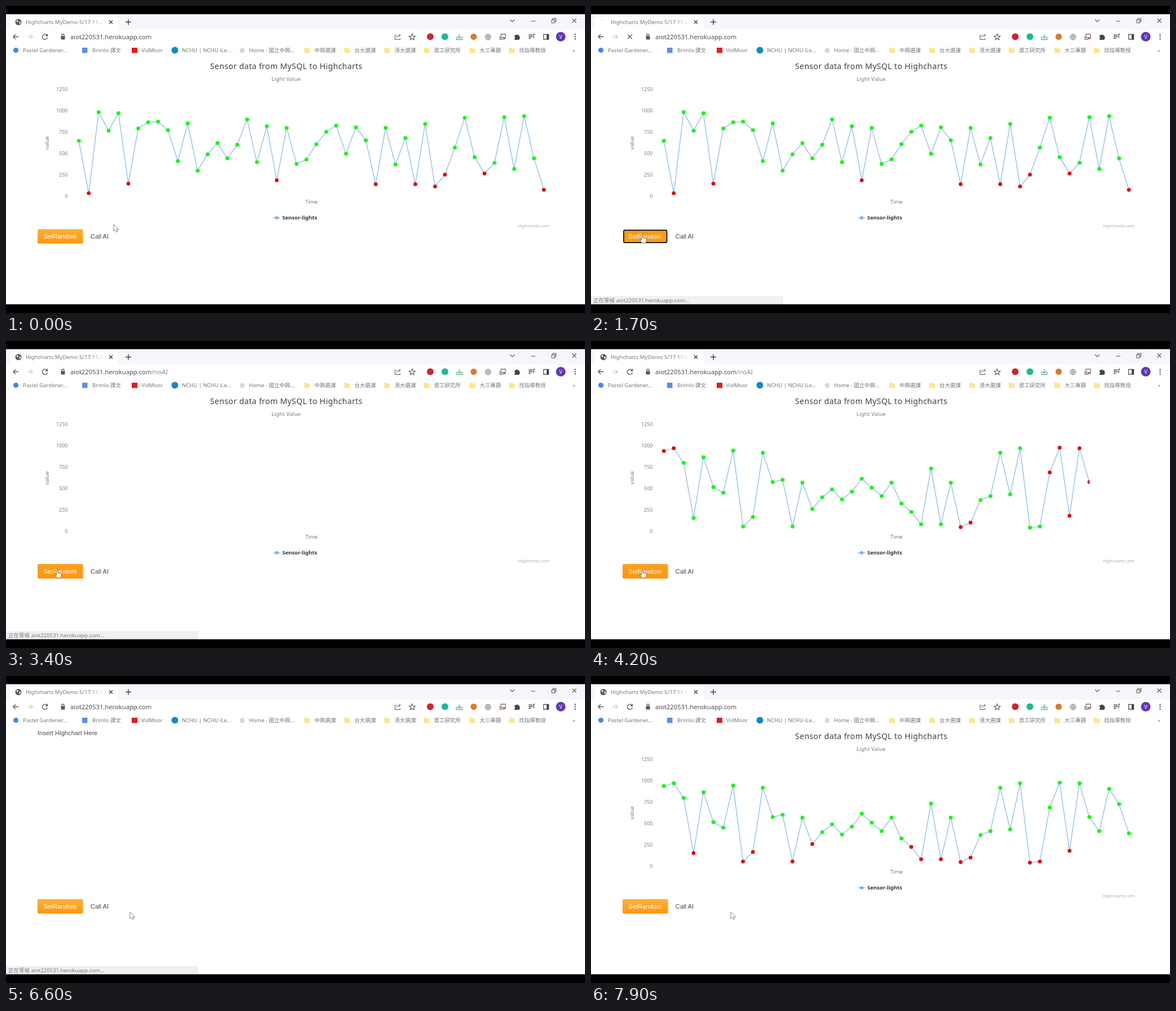
An HTML page for the animation above (8 s loop, 1027x545 px).

```html
<!DOCTYPE html>
<html lang="en">
<head>
<meta charset="utf-8">
<title>Sensor chart</title>
<style>
  html, body { margin: 0; width: 100%; height: 100%; overflow: hidden; background: #fff; }
  svg { display: block; width: 1027px; height: 545px; }
  text { font-family: "Noto Sans", "Noto Sans CJK TC", "Noto Sans CJK", sans-serif; font-size: 9.5px; fill: #777; white-space: pre; }
  .page { font-family: "Liberation Sans", Arial, sans-serif; font-size: 11.2px; fill: #4a4a4a; }
  .url { font-size: 11.2px; fill: #505050; }
  .axis { font-size: 9px; text-anchor: end; fill: #808080; }
  .icon { fill: none; stroke: #555; stroke-width: 1.3; }
</style>
</head>
<body>
<svg viewBox="0 0 1027 545">
  <defs>
    <linearGradient id="orange" x2="0" y2="1">
      <stop offset="0" stop-color="#ffb138"/><stop offset="1" stop-color="#ff9610"/>
    </linearGradient>
    <linearGradient id="hover" x2="0" y2="1">
      <stop offset="0" stop-color="#ff9f1c"/><stop offset="1" stop-color="#ff960e"/>
    </linearGradient>
    <linearGradient id="fade">
      <stop offset="0" stop-color="#fff" stop-opacity="0"/><stop offset="1" stop-color="#fff"/>
    </linearGradient>
    <clipPath id="reveal"><rect id="window" x="0" y="140" width="1027" height="210"/></clipPath>
  </defs>
  <rect width="1027" height="545" fill="#fff"/>

  <!-- tab strip -->
  <rect y="14" width="1027" height="28" fill="#f5f7fa"/>
  <path d="M2 42Q7 42 7 37V24Q7 19 12 19H194Q199 19 199 24V37Q199 42 204 42Z" fill="#fff"/>
  <g id="globe">
    <circle cx="22" cy="28.5" r="5.5" fill="#5a5a5a"/>
    <path d="M18 26l3-1 1 2-2 2zM23 29l3-2 0 3-2 2z" fill="#eee"/>
  </g>
  <path id="spinner" d="M18 24.5A5.5 5.5 0 0 1 22 23" fill="none" stroke="#e4e4e4" stroke-width="1.4"/>
  <text x="35" y="31.8" style="font-size:9.6px">Highcharts MyDemo 5/17 11:2</text>
  <rect x="152" y="20" width="22" height="18" fill="url(#fade)"/>
  <g class="icon">
    <path d="M183 25.500l6 6m0-6l-6 6M217 23.500v10m-5-5h10" stroke="#444" stroke-width="1.500"/>
    <path d="M894 24l4 4 4-4M931 27h8M968 24.500h5.500v5.500H968zM970 24v-2h5.500v5.500h-2M1004.500 22.500l7 7m0-7l-7 7" stroke-width="1.100"/>
  </g>

  <!-- toolbar -->
  <g class="icon">
    <path d="M22 54.500H13m4-4.200l-4.200 4.200 4.200 4.200"/>
    <path d="M38 54.500h9m-4-4.200l4.200 4.200-4.200 4.200" stroke="#ccc"/>
    <path id="reload" d="M72.700 52A4.600 4.600 0 1 0 73.500 56M73.500 49.500v3.500H70"/>
    <path id="stop" d="M65 50.500l8 8m0-8l-8 8"/>
    <path d="M99 54v-2a2 2 0 0 1 4 0v2"/>
    <path d="M693 52h-3v7.500h9V57M693 56q1-4 6-4m-2-2.500l2.700 2.500-2.700 2.500" stroke-width="1"/>
    <path d="M720.500 49.500l1.500 3.700 4 .3-3.100 2.500 1 3.800-3.400-2.100-3.400 2.100 1-3.800-3.100-2.500 4-.3z" stroke-width="1.100"/>
    <path d="M800 54l4 3 4-3M799 55v4.500h10V55M804 50v6" stroke="#57b77b"/>
    <circle cx="855" cy="55" r="5" fill="#ccc" stroke="#aaa"/>
    <path d="M850 55h10M855 50v10" stroke="#999" stroke-width=".8"/>
    <path d="M878 50h8v6h-8zM876 53v6h6" stroke="#777"/>
    <path d="M927 51.500h7m-7 3h7m-7 3h4M936 50v7m0-7h2" stroke="#444"/>
    <path d="M953.500 50.500h9v8.500h-9z"/>
  </g>
  <rect x="97.500" y="53.500" width="7" height="6" rx="1" fill="#555"/>
  <rect x="959" y="50" width="4" height="9.500" fill="#444"/>
  <rect x="882" y="55" width="4" height="4" fill="#c66"/>
  <path d="M902 52h2.500a1.800 1.800 0 0 1 3.500 0h2.500v2.500a1.800 1.800 0 0 1 0 3.500v2H902v-2.300a1.700 1.700 0 0 0 0-3.200z" fill="#444"/>
  <circle cx="752.500" cy="54.500" r="6" fill="#cf2430"/>
  <circle cx="778.500" cy="54.500" r="6" fill="#17bd91"/>
  <circle cx="829.500" cy="54.500" r="5.500" fill="#dd7a25"/>
  <circle cx="984" cy="54.500" r="8.500" fill="#6038b5"/>
  <text x="984" y="57.800" text-anchor="middle" style="fill:#fff;font-size:9px">V</text>
  <g fill="#555"><circle cx="1009.500" cy="50.500" r="1.200"/><circle cx="1009.500" cy="54.500" r="1.200"/><circle cx="1009.500" cy="58.500" r="1.200"/></g>
  <text class="url" x="114" y="58.700">aiot220531.herokuapp.com<tspan id="route" fill="#888">/noAI</tspan></text>

  <!-- bookmarks -->
  <circle cx="17.500" cy="78.500" r="4.500" fill="#4285f4"/>
  <rect x="135" y="74" width="9.500" height="9.500" fill="#5b8fe6"/>
  <rect x="223" y="74" width="10" height="9.500" fill="#e51c1c"/>
  <circle cx="299.500" cy="78.500" r="6" fill="#1488cc"/>
  <circle cx="419" cy="79" r="4.500" fill="#d5dadc"/>
  <g id="marks"></g>

  <!-- page -->
  <text class="page" id="insert" x="56" y="104.500">Insert Highchart Here</text>
  <g id="chart">
    <text x="362" y="111.500" style="font-size:14px;letter-spacing:.4px;fill:#404040">Sensor data from MySQL to Highcharts</text>
    <text x="471" y="132.800" style="letter-spacing:.2px">Light Value</text>
    <g id="ticks"></g>
    <text transform="translate(76 243) rotate(-90)" text-anchor="middle">value</text>
    <text x="531" y="350.500">Time</text>
    <path d="M474 376h12" stroke="#7cb5ec" stroke-width="1.500"/>
    <circle cx="480" cy="376" r="3" fill="#7cb5ec"/>
    <text x="490" y="379.400" style="font-weight:700;fill:#333">Sensor-lights</text>
    <text x="908" y="393" style="font-size:7.5px;fill:#aaa">Highcharts.com</text>
    <g id="series" clip-path="url(#reveal)"></g>
  </g>
  <rect id="button" x="56" y="396" width="80.500" height="25.700" rx="2.500"/>
  <rect id="focus" x="58" y="398" width="76.500" height="22" rx="2" fill="#fd9a14" stroke="#222" stroke-width="2"/>
  <text class="page" x="66.200" y="413" style="fill:#fff">SetRandom</text>
  <text class="page" x="149.800" y="413">Call AI</text>

  <g id="status">
    <rect y="515" width="341" height="15" fill="#eef1f4"/>
    <text x="4" y="526.300">正在等候 aiot220531.herokuapp.com...</text>
  </g>
  <g id="cursor">
    <path id="arrow" d="M0 0V12L3 9.400L5 13.500L7 12.600L5 8.800H8.800Z" fill="#fff" stroke="#777" stroke-width=".9"/>
    <path id="hand" transform="scale(1.1)" d="M-1 1Q0-.8 1 1V5L5.500 6.200Q7 6.700 6.800 8.500L5.500 13.500H-.5L-3.500 9Q-3.500 7.500-1 8.500Z" fill="#fff" stroke="#666" stroke-width=".8"/>
  </g>
  <rect width="1027" height="14.500"/>
  <rect y="529.500" width="1027" height="15.500"/>
</svg>
<script>
const LOOP = 8000, STEP = 100;
const PLOT = { left: 120, width: 845 }, REVEAL = 1000;
const $ = id => document.getElementById(id);

function add(parent, tag, attrs, text = '') {
  const el = document.createElementNS('http://www.w3.org/2000/svg', tag);
  for (const key in attrs) el.setAttribute(key, attrs[key]);
  el.textContent = text;
  parent.append(el);
  return el;
}

// Bookmark labels; entries with a third value get a folder icon.
[[30, 'Pastel Gardener...'], [153, 'Brimlo 譯文'], [240, 'VidMoor'],
 [312, 'NCHU | NCHU iLe...'], [431, 'Home - 國立中興...'],
 [547, '中興選課', 1], [618, '台大選課', 1], [689, '清大選課', 1],
 [759, '資工研究所', 1], [840, '大三專題', 1], [910, '找指導教授', 1], [1005, '»']
].forEach(([x, label, folder]) => {
  add($('marks'), 'text', { x, y: 82.4 }, label);
  if (folder) add($('marks'), 'path', { d: `M${x - 18} 74h4l1 1.500h5v8h-10z`, fill: '#fde68c' });
});

for (let i = 0; i <= 5; i++)
  add($('ticks'), 'text', { class: 'axis', x: 109.5, y: 341.3 - 38.1 * i }, 250 * i);

// Heights of the points on the stage.
const before = [239, 332, 188, 221, 190, 315, 217, 206, 205, 220, 275, 208, 292, 263, 243, 270,
  246, 201, 277, 213, 309, 216, 280, 272, 245, 223, 212, 262, 215, 238, 316, 216,
  281, 234, 316, 209, 320, 299, 251, 198, 268, 297, 278, 197, 289, 195, 270, 326];
const after = [195, 190, 216, 314, 206, 259, 269, 194, 329, 312, 198, 250, 246, 329, 251, 298,
  277, 263, 281, 267, 244, 260, 275, 251, 288, 303, 325, 226, 325, 251, 330, 322,
  282, 275, 198, 272, 190, 331, 329, 233, 189, 310, 190, 250, 275, 200, 227, 279];
const isLow = y => y > 295;
const inRandomPick = (y, i) => i < 2 || i === 30 || i === 31 || (i > 38 && i < 44);

function makeSeries(ys, isRed) {
  const g = add($('series'), 'g', {});
  const points = ys.map((y, i) => [129.2 + 17.55 * i, y + .4]);
  add(g, 'polyline', { points: points.join(' '), fill: 'none', stroke: '#8abdec', 'stroke-width': 1.3 });
  points.forEach(([cx, cy], i) =>
    add(g, 'circle', { cx, cy, r: 3.3, fill: isRed(ys[i], i) ? '#e60000' : '#0f0' }));
  return g;
}

const charts = [
  { from: 0, to: 2500, start: -REVEAL, g: makeSeries(before, isLow) },
  { from: 3400, to: 6300, start: 3400, g: makeSeries(after, inRandomPick) },
  { from: 6900, to: LOOP, start: 6920, g: makeSeries(after, isLow) }
];

const path = [[0, 191, 388], [200, 172, 391], [400, 122, 402], [600, 91, 406], [4700, 91, 406],
  [5000, 118, 424], [5250, 150, 438], [5500, 170.5, 432], [5600, 169, 424], [5800, 164, 407],
  [6200, 164, 407], [6600, 219.8, 419], [7000, 247.8, 419], [LOOP, 247.8, 419]];

function cursorAt(t) {
  const i = Math.max(1, path.findIndex(p => p[0] >= t));
  const [t0, x0, y0] = path[i - 1], [t1, x1, y1] = path[i];
  const k = (t - t0) / (t1 - t0);
  return [x0 + (x1 - x0) * k, y0 + (y1 - y0) * k];
}

const show = (el, on) => { el.style.display = on ? '' : 'none'; };

function draw(t) {
  const within = (...spans) => spans.some(([a, b]) => t >= a && t < b);
  const loading = within([1500, 2500], [6000, 6300]);
  const pressed = within([1500, 2500]);
  show($('globe'), !loading);
  show($('spinner'), loading);
  show($('reload'), !loading);
  show($('stop'), loading);
  show($('route'), within([2500, 6300]));
  show($('status'), within([1600, 3500], [6100, 7000]));
  show($('focus'), pressed);
  show($('button'), !pressed);

  const active = charts.find(c => within([c.from, c.to]));
  show($('chart'), active);
  show($('insert'), !active);
  charts.forEach(c => show(c.g, c === active));
  if (active) {
    const p = Math.min(1, Math.max(0, (t - active.start) / REVEAL));
    const eased = (1 - Math.cos(Math.PI * p)) / 2;
    $('window').setAttribute('width', p ? PLOT.left + PLOT.width * eased : 0);
  }

  const [x, y] = cursorAt(t);
  const inRow = y > 396 && y < 422;
  const onButton = inRow && x > 56 && x < 136;
  const onLink = inRow && x > 141 && x < 190;
  $('cursor').setAttribute('transform', `translate(${x} ${y})`);
  show($('hand'), onButton || onLink);
  show($('arrow'), !onButton && !onLink);
  $('button').setAttribute('fill', onButton ? 'url(#hover)' : 'url(#orange)');
}

const origin = performance.now();
function tick() {
  const t = (performance.now() - origin) % LOOP;
  draw(Math.floor(t / STEP) * STEP);
  requestAnimationFrame(tick);
}
tick();
</script>
</body>
</html>
```
